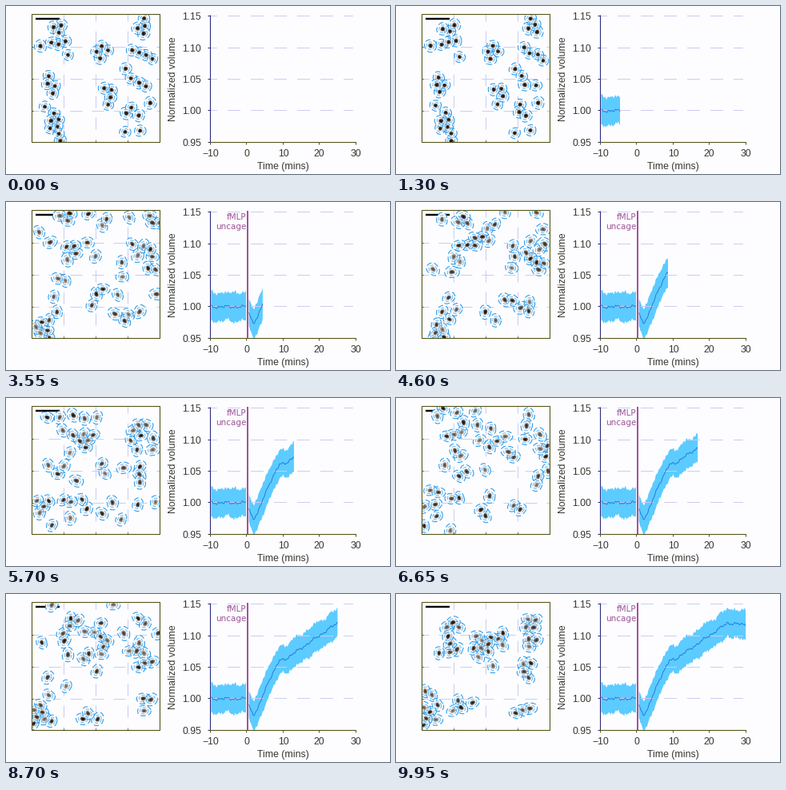
Write a matplotlib script that moves like this. It is 480 px wide and 210 px high and loops after 10 s.

```python
import numpy as np
import matplotlib.pyplot as plt
from matplotlib.animation import FuncAnimation
from matplotlib.collections import PolyCollection
from matplotlib.patches import Rectangle

W, H, DPI = 480, 210, 100
FRAMES, INTERVAL = 200, 50
UNCAGE = 50                       # step at which the cells wake up
COUNT = 46
LEFT, TOP, RIGHT, BOTTOM = 32.5, 10.5, 192.5, 170.5
PAPER, BLUE, BAND, LINE = "#fdfdff", "#2f9be8", "#5ccbff", "#1f78d6"
GRID, PURPLE, OLIVE, NAVY, INK = "#ccccf2", "#a0559a", "#56561c", "#2c2c7c", "#363630"

rng = np.random.default_rng(7)

# Neighbourhoods of cells: where each one rests and where it ends up
REST = [(66, 28), (66, 55), (58, 100), (62, 130), (68, 160), (112, 60),
        (128, 115), (172, 28), (172, 60), (167, 90), (168, 135), (160, 155)]
GOAL = [(68, 45), (68, 68), (108, 65), (42, 140), (42, 157), (120, 72),
        (85, 140), (170, 35), (132, 62), (155, 92), (175, 60), (155, 155)]


def scatter(hubs, spread):
    home = np.arange(COUNT) % len(hubs)
    return np.array(hubs, float)[home] + rng.normal(0, spread, (COUNT, 2))


def fold(pts):
    """Reflect places that fall outside the panel back into it."""
    low = np.array([LEFT + 2, TOP + 2])
    span = np.array([RIGHT - 2, BOTTOM - 2]) - low
    return low + span - np.abs((pts - low) % (2 * span) - span)


def push_apart(pts, gap=9.5, rounds=8):
    for _ in range(rounds):
        delta = pts[:, None] - pts[None]
        dist = np.hypot(delta[..., 0], delta[..., 1]) + 1e-6
        push = np.clip(gap - dist, 0, None) / dist * 0.3
        pts = pts + (delta * push[..., None]).sum(axis=1)
    return pts


def smooth_walk(steps, sigma):
    """Random walk that leaves from zero and returns to it."""
    moves = rng.normal(0, sigma, (steps, COUNT, 2))
    moves = sum(np.roll(moves, k, axis=0) for k in range(9)) / 9
    walk = np.cumsum(moves, axis=0)
    return walk - np.linspace(0, 1, steps)[:, None, None] * walk[-1]


def make_paths():
    rest, goal = scatter(REST, 9), scatter(GOAL, 8)
    u = np.linspace(0, 1, FRAMES - UNCAGE)[:, None, None]
    moving = rest + u * (goal - rest) + smooth_walk(FRAMES - UNCAGE, 4)
    still = rest + smooth_walk(UNCAGE, 0.7)
    return [push_apart(fold(p)) for p in np.concatenate([still, moving])]


paths = make_paths()
turn, ripple, shade = rng.uniform(0, 2 * np.pi, (3, COUNT, 1))
shade = shade / (2 * np.pi)
size = rng.uniform(0.92, 1.08, (COUNT, 1))
THETA = np.linspace(0, 2 * np.pi, 28, endpoint=False)


def wakefulness(n):
    return np.clip((n - UNCAGE) / 12, 0, 1)


def outlines(n, radius, wobble):
    """Slightly irregular rings, longer once the cells are awake."""
    awake = wakefulness(n)
    r = radius * size * (1 + 0.06 * awake)
    r = r * (1 + (0.03 + 0.1 * awake) * wobble * np.cos(2 * (THETA - turn - 0.02 * n * awake))
             + 0.04 * wobble * np.sin(3 * THETA + ripple + 0.15 * n))
    return paths[n][:, None] + np.stack([r * np.cos(THETA), r * np.sin(THETA)], axis=2)


# Volume trace
def waves(t, amp, *freqs):
    return amp * sum(np.sin(f * t + rng.uniform(0, 2 * np.pi)) for f in freqs)


def to_x(t):
    return 255.5 + 4.54 * (t + 10)


def to_y(v):
    return 170.5 - 790 * (v - 0.95)


time = -10 + 0.2 * np.arange(1, FRAMES + 1)
gap = (time > -0.1) & (time < 0.5)
mean = np.interp(time, [0, 0.6, 1.8, 3, 6, 9, 11, 20, 25, 30],
                 [1, 0.99, 0.975, 0.983, 1.028, 1.06, 1.064, 1.1, 1.12, 1.117])
mean += waves(time, 0.0011, 1.3, 2.9, 6.7)
half = 0.0225 + 0.005 * np.exp(-((time - 4.6) / 1.2) ** 2)
upper = mean + half + waves(time, 0.0012, 1.1, 1.9, 9)
lower = mean - half + waves(time, 0.0012, 1.2, 2.1, 10)
mean[gap] = np.nan


# Stage in pixel coordinates
fig = plt.figure(figsize=(W / DPI, H / DPI), dpi=DPI, facecolor=PAPER)
ax = fig.add_axes([0, 0, 1, 1])
ax.set(xlim=(0, W), ylim=(H, 0))
ax.axis("off")


def px(v):
    return v * 72 / DPI


def stroke(xs, ys, color, width=1, **kw):
    return ax.plot(xs, ys, color=color, lw=px(width), snap=False,
                   solid_capstyle="butt", dash_capstyle="butt", **kw)[0]


def label(x, y, text, color=INK, height=12.3, font="Liberation Sans", **kw):
    return ax.text(x, y, text, color=color, fontsize=px(height), family=font, **kw)


# Microscope panel
dashes = (6, (15, 12))
for k in range(3):
    x, y = 72.5 + 40 * k, 51.5 + 40 * k
    stroke([x, x], [TOP, BOTTOM], GRID, ls=dashes, zorder=1)
    stroke([LEFT, RIGHT], [y, y], GRID, ls=dashes, zorder=1)
    stroke([x, x], [BOTTOM - 2, BOTTOM], OLIVE, zorder=6)
    stroke([LEFT, LEFT + 2], [y, y], OLIVE, zorder=6)
stroke([37, 67], [16, 16], "black", 2.4, zorder=2)
frame = Rectangle((LEFT, TOP), RIGHT - LEFT, BOTTOM - TOP, fill=False,
                  ec=OLIVE, lw=px(1.1), snap=False, zorder=6)
ax.add_patch(frame)


def cell_layer(radius, wobble, **style):
    coll = PolyCollection([], zorder=3 + len(layers) / 10, **style)
    ax.add_collection(coll, autolim=False)
    coll.set_clip_path(frame)
    layers.append((coll, radius, wobble))
    return coll


def ring(radius, color, width, dash):
    cell_layer(radius, 1, facecolors="none", edgecolors=color,
               lw=px(width), linestyles=[(0, dash)])


layers = []
cell_layer(7.3, 1, facecolors=PAPER, edgecolors="none")
ring(7.3, BLUE, 1.1, (6, 3))
ring(4.6, "#5db4f0", 0.9, (5, 2.5))
cell_layer(3.2, 1.2, facecolors="#c8c5c2", edgecolors="none")
body = cell_layer(2.5, 1.3, edgecolors="none")
core = cell_layer(1.4, 1.3, edgecolors="none")
BROWN = np.array([0.30, 0.26, 0.22])

# Volume panel
for v in np.linspace(0.95, 1.15, 5):
    y = np.floor(to_y(v)) + 0.5
    if y < BOTTOM:
        stroke([256, 434], [y, y], GRID, ls=(8, (16, 13)), zorder=4)
    stroke([252.5, 256], [y, y], NAVY, zorder=6)
    label(244.2, y + 4.3, f"{v:.2f}", ha="right")
for t in range(-10, 31, 10):
    x = np.floor(to_x(t)) + 0.5
    stroke([x, x], [170, 173.5], OLIVE, zorder=6)
    label(x, 188.5, str(t).replace("-", "\u2212"), ha="center")
stroke([255.5, 255.5], [11.5, 171], NAVY, 1.1, zorder=6)
stroke([255, 437.5], [170.5, 170.5], OLIVE, 1.1, zorder=6)
label(346, 204, "Time (mins)", ha="center")
label(209, 91, "Normalized volume", ha="center", va="center", rotation=90)

band = PolyCollection([], facecolors=BAND, edgecolors="none", zorder=3)
ax.add_collection(band, autolim=False)
trace = stroke([], [], LINE, 0.9, zorder=5)
marker = [stroke([302, 302], [11, 170], PURPLE, 2, zorder=7),
          label(300.5, 21.5, "fMLP", PURPLE, 10.4, "DejaVu Sans", ha="right"),
          label(300.5, 33.5, "uncage", PURPLE, 10.4, "DejaVu Sans", ha="right")]


def band_part(sel):
    x, top, bottom = to_x(time[sel]), to_y(upper[sel]), to_y(lower[sel])
    return np.column_stack([np.r_[x, x[::-1]], np.r_[top, bottom[::-1]]])


def update(n):
    for coll, radius, wobble in layers:
        coll.set_verts(outlines(n, radius, wobble))
    fade = wakefulness(n) * shade
    body.set_facecolor(BROWN + 0.35 * fade)
    core.set_facecolor(0.3 * BROWN + 0.35 * fade)
    shown = (np.arange(FRAMES) <= n) & ~gap
    parts = [shown & (time < 0), shown & (time > 0)]
    band.set_verts([band_part(p) for p in parts if p.sum() > 1])
    trace.set_data(to_x(time[:n + 1]), to_y(mean[:n + 1]))
    for item in marker:
        item.set_visible(n >= UNCAGE)
    return []


anim = FuncAnimation(fig, update, frames=FRAMES, interval=INTERVAL, repeat=True)
plt.show()
```
